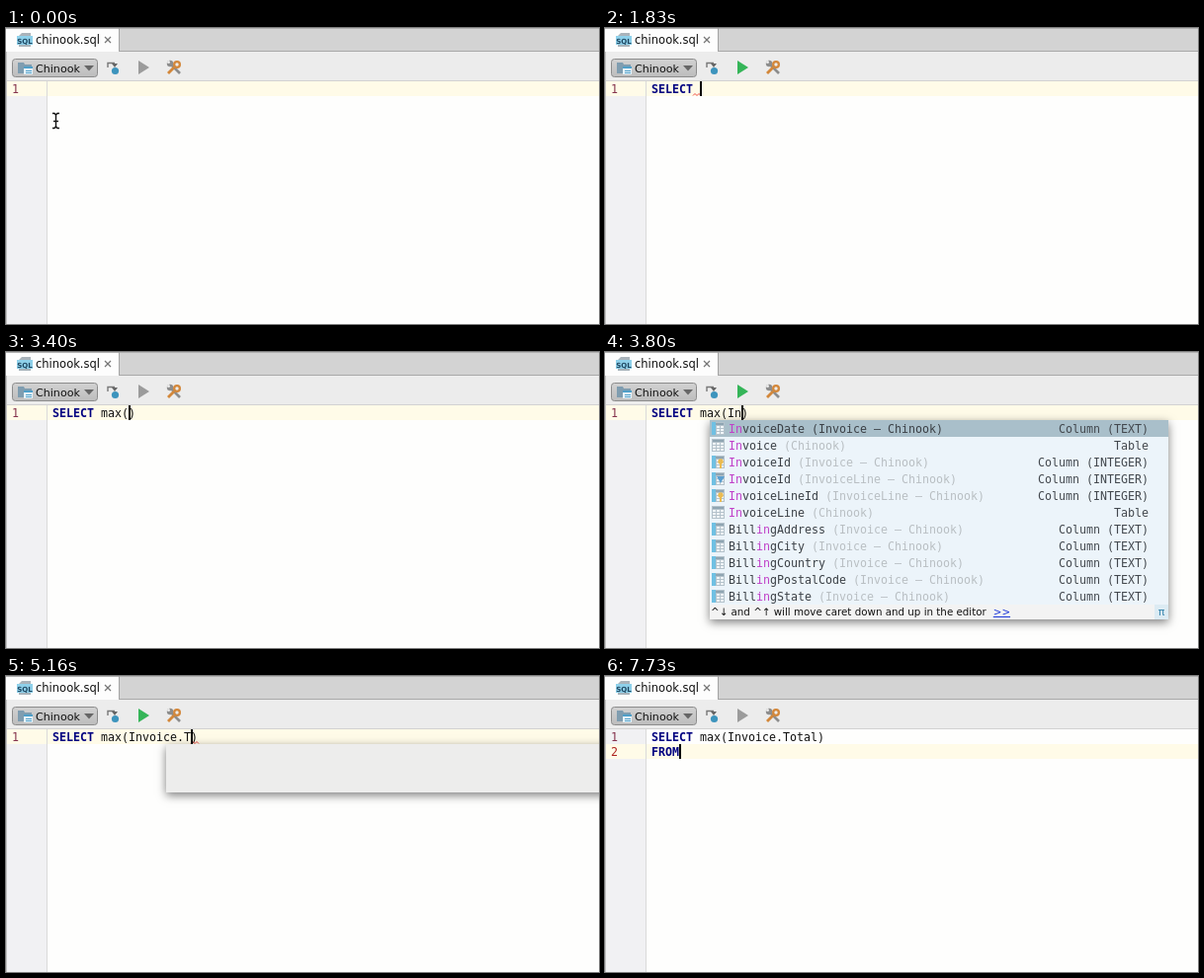
Animation, 600 px wide and 300 px high, one loop 8 s. Source, as an HTML page with a canvas:

```html
<!DOCTYPE html>
<html lang="en">
<head>
<meta charset="utf-8">
<title>SQL completion</title>
<style>
  html, body { margin: 0; width: 100%; height: 100%; overflow: hidden; background: #fefefd; }
  canvas { display: block; width: 600px; height: 300px; }
</style>
</head>
<body>
<canvas id="stage" width="600" height="300"></canvas>
<script>
const ctx = document.getElementById('stage').getContext('2d');
const LOOP = 8000, CHAR = 7, LINE = 15, ROW = 17, LEFT = 47, TOP = 54;
const MONO = '11.63px "DejaVu Sans Mono", monospace';
const UI = '"DejaVu Sans", sans-serif';

// ---- drawing helpers ----
function rect(x, y, w, h, color) {
  ctx.fillStyle = color;
  ctx.fillRect(x, y, w, h);
}

function text(str, x, y, color, font = MONO, align = 'left') {
  ctx.font = font;
  ctx.textAlign = align;
  ctx.fillStyle = color;
  ctx.fillText(str, x, y);
  return ctx.measureText(str).width;
}

function shape(points, color) {
  ctx.fillStyle = color;
  ctx.beginPath();
  points.forEach(([x, y]) => ctx.lineTo(x, y));
  ctx.fill();
}

function stroke(points, color, width = 1) {
  ctx.strokeStyle = color;
  ctx.lineWidth = width;
  ctx.beginPath();
  points.forEach(([x, y], i) => i ? ctx.lineTo(x, y) : ctx.moveTo(x, y));
  ctx.stroke();
}

function disc(x, y, r, color) {
  ctx.fillStyle = color;
  ctx.beginPath();
  ctx.arc(x, y, r, 0, 7);
  ctx.fill();
}

function vertical(y0, y1, from, to) {
  const g = ctx.createLinearGradient(0, y0, 0, y1);
  g.addColorStop(0, from);
  g.addColorStop(1, to);
  return g;
}

// ---- completion data ----
const item = (kind, name, detail = '', type = '') => ({ kind, name, detail, type });
const column = (kind, name, table, type = 'INTEGER') =>
  item(kind, name, ` (${table} – Chinook)`, `Column (${type})`);
const table = name => item('table', name, ' (Chinook)', 'Table');
const func = (name, args) => item('func', name, `(${args})`, 'Core Function');
const keyword = name => item('keyword', name);
const pair = name => [func(name, 'X'), func(name, 'X,Y,...')];
const billing = ['Address', 'City', 'Country', 'PostalCode', 'State']
  .map(part => column('column', 'Billing' + part, 'Invoice', 'TEXT'));

const mItems = [
  column('key', 'MediaTypeId', 'MediaType'), table('MediaType'),
  column('ref', 'MediaTypeId', 'Track'), column('column', 'Milliseconds', 'Track'),
  ...pair('max'), ...pair('min'),
  column('key', 'AlbumId', 'Album'), table('Album'), column('ref', 'AlbumId', 'Track')
];
const maItems = [...pair('max'),
  column('column', 'Email', 'Customer', 'TEXT'), column('column', 'Email', 'Employee', 'TEXT')];
const invoiceItems = [
  column('column', 'InvoiceDate', 'Invoice', 'TEXT'), table('Invoice'),
  column('key', 'InvoiceId', 'Invoice'), column('ref', 'InvoiceId', 'InvoiceLine'),
  column('key', 'InvoiceLineId', 'InvoiceLine'), table('InvoiceLine')
];
const tableFirst = [invoiceItems[1], invoiceItems[0], ...invoiceItems.slice(2)];
const columnItems = [invoiceItems[0], invoiceItems[2], ...billing];
const totalItems = [column('column', 'Total', 'Invoice', 'NUMERIC'), column('ref', 'CustomerId', 'Invoice')];

const DOT_HINT = 'Press ^. to choose the selected (or first) suggestion and insert a dot afterwards';
const MOVE_HINT = '^↓ and ^↑ will move caret down and up in the editor';

const popup = (x, right, y, items, typed, extra) =>
  ({ x, right, y, items, typed, listHeight: items.length * ROW, ...extra });
const blank = (x, right, y = 69) => ({ x, right, y, blank: true });
const keywords = (typed, y, ...names) => popup(40, 505, y, names.map(keyword), typed, { plain: true });
const functions = (typed, items, extra) => popup(78, 578, 69, items, typed, extra);
const invoices = (typed, items, right = 570) => popup(106, right, 69, items, typed);
const columns = (typed, items) => popup(162, 620, 69, items, typed);
const call = inner => `SELECT max(${inner})`;

// ---- timeline: each entry changes part of the state ----
const timeline = [
  [0, { lines: [''], caret: null, mouse: true, popup: null, bold: [], run: false, marks: [], squiggle: null }],
  [200, { mouse: false }],
  [360, { lines: ['S'], caret: [0, 1] }],
  [400, { popup: blank(40, 508) }],
  [430, { popup: keywords('S', 69, 'SELECT', 'SAVEPOINT') }],
  [700, { lines: ['SE'], caret: [0, 2] }],
  [760, { popup: keywords('SE', 69, 'SELECT') }],
  [830, { lines: ['SEL'], caret: [0, 3] }],
  [870, { popup: keywords('SEL', 69, 'SELECT') }],
  [960, { lines: ['SELE'], caret: [0, 4] }],
  [1000, { popup: keywords('SELE', 69, 'SELECT') }],
  [1500, { lines: ['SELECT'], caret: [0, 6], popup: null }],
  [1560, { bold: [0] }],
  [1800, { lines: ['SELECT '], caret: [0, 7] }],
  [1830, { run: true, squiggle: 6 }],
  [2100, { run: false }],
  [2330, { lines: ['SELECT m'], caret: [0, 8] }],
  [2400, { popup: blank(78, 578) }],
  [2460, { popup: functions('m', mItems, { listHeight: 179, thumb: true }) }],
  [2730, { lines: ['SELECT ma'], caret: [0, 9] }],
  [2760, { popup: functions('ma', maItems) }],
  [3060, { lines: ['SELECT max'], caret: [0, 10] }],
  [3100, { popup: functions('max', pair('max')) }],
  [3400, { lines: [call('')], caret: [0, 11], popup: null, squiggle: null }],
  [3430, { run: true }],
  [3560, { lines: [call('I')], caret: [0, 12] }],
  [3600, { popup: blank(106, 570) }],
  [3640, { popup: invoices('I', [...invoiceItems, ...billing]) }],
  [3730, { lines: [call('In')], caret: [0, 13] }],
  [3770, { popup: invoices('In', [...invoiceItems, ...billing]) }],
  [3900, { lines: [call('Inv')], caret: [0, 14] }],
  [3960, { popup: invoices('Inv', invoiceItems, 560) }],
  [4100, { lines: [call('Invo')], caret: [0, 15], popup: invoices('Invo', invoiceItems, 560) }],
  [4300, { popup: invoices('Invo', tableFirst, 560) }],
  [4560, { lines: [call('Invoice')], caret: [0, 18], popup: null }],
  [4600, { lines: [call('Invoice.')], caret: [0, 19], squiggle: 19 }],
  [4700, { popup: blank(162, 620) }],
  [4760, { popup: columns('', columnItems) }],
  [5160, { lines: [call('Invoice.T')], caret: [0, 20], popup: blank(162, 620), squiggle: 20 }],
  [5200, { popup: columns('T', totalItems) }],
  [5530, { lines: [call('Invoice.Total')], caret: [0, 24], popup: null, squiggle: null }],
  [5860, { marks: [[19, 5, '#e2e2f6']] }],
  [6500, { caret: [0, 25] }],
  [6560, { marks: [[19, 5, '#e2e2f6'], [10, 1, '#99d1f2'], [24, 1, '#99d1f2']] }],
  [6800, { lines: [call('Invoice.Total'), ''], caret: [1, 0] }],
  [6850, { marks: [] }],
  [6900, { lines: [call('Invoice.Total'), 'F'], caret: [1, 1] }],
  [6930, { popup: blank(40, 505, 84) }],
  [6960, { popup: keywords('F', 84, 'FROM') }],
  [7000, { lines: [call('Invoice.Total'), 'FR'], caret: [1, 2] }],
  [7050, { run: false }],
  [7100, { popup: keywords('FR', 84, 'FROM') }],
  [7630, { lines: [call('Invoice.Total'), 'FROM'], caret: [1, 4], popup: null }],
  [7700, { bold: [0, 1] }]
];

const stateAt = time => Object.assign({}, ...timeline.filter(([t]) => t <= time).map(([, s]) => s));

// ---- window chrome ----
function drawTab() {
  rect(0, 0, 600, 24, '#d3d3d3');
  rect(0, 0, 114, 24, '#fdfdfd');
  rect(0, 0, 600, 1, '#b2b2b2');
  rect(114, 0, 1, 24, '#a3a3a3');
  rect(114, 23, 486, 1, '#a8a8a8');
  shape([[16, 5], [25, 5], [25, 19], [13, 19], [13, 8]], '#a9b3ba');
  rect(11, 8, 16, 9, '#8ed0ea');
  text('SQL', 19, 15.5, '#1e4660', `bold 7px ${UI}`, 'center');
  text('chinook.sql', 30, 16, '#111', `11.5px ${UI}`);
  stroke([[100, 9], [106, 15]], '#777', 1.3);
  stroke([[106, 9], [100, 15]], '#777', 1.3);
}

function drawToolbar(run) {
  rect(0, 24, 600, 30, '#ececec');
  rect(0, 53, 600, 1, '#d2d2d2');

  ctx.beginPath();
  ctx.roundRect(6.5, 31.5, 86, 18, 3);
  ctx.fillStyle = vertical(31, 50, '#d2d2d2', '#bcbcbc');
  ctx.fill();
  ctx.strokeStyle = '#8c8c8c';
  ctx.lineWidth = 1;
  ctx.stroke();
  shape([[12, 35], [18, 35], [19, 37], [26, 37], [26, 46], [12, 46]], '#7f9db0');
  rect(18, 39, 9, 8, '#e6f3fa');
  rect(18, 39, 9, 2, '#4f9fc8');
  rect(20, 43, 6, 1, '#4f9fc8');
  rect(20, 45, 6, 1, '#4f9fc8');
  text('Chinook', 30, 45, '#111', `11.1px ${UI}`);
  shape([[79, 38], [89, 38], [84, 43.5]], '#666');

  stroke([[103, 40], [103, 35.5], [110, 35.5]], '#777', 1.4);
  shape([[107, 36], [113, 36], [110, 40]], '#666');
  disc(110.5, 43.5, 3.6, '#3d94bd');

  shape([[134, 33], [145, 40], [134, 47]], run ? '#35b558' : '#9b9b9b');

  stroke([[166, 36], [176, 46]], '#8d8d8d', 2.6);
  disc(166, 36, 3.2, '#8d8d8d');
  disc(164.5, 34.5, 1.5, '#ececec');
  stroke([[164, 46], [170, 40]], '#d3873a', 2.8);
  disc(173, 37, 4, '#d3873a');
  disc(173, 37, 1.7, '#ececec');
}

// ---- editor ----
function drawEditor(state) {
  const current = state.caret ? state.caret[0] : 0;
  rect(0, TOP, 600, 246, '#fefefd');
  rect(0, TOP, 41, 246, '#f1f1f3');
  rect(0, TOP + current * LINE, 600, LINE, '#fffbe8');
  rect(41, TOP, 1, 246, '#dadada');
  rect(0, 24, 1, 276, '#c3c3c3');

  for (const [col, length, color] of state.marks)
    rect(LEFT + col * CHAR, TOP, length * CHAR, LINE, color);

  state.lines.forEach((line, i) => {
    const y = TOP + 12 + i * LINE;
    text(String(i + 1), 6, y, i ? '#ae2420' : '#86344e');
    const split = state.bold.includes(i) ? line.match(/^\w+/)[0].length : 0;
    text(line.slice(0, split), LEFT, y, '#000080', 'bold ' + MONO);
    text(line.slice(split), LEFT + split * CHAR, y, '#111');
  });

  if (state.squiggle !== null) {
    const x = LEFT + state.squiggle * CHAR;
    stroke([0, 2, 4, 6, 8].map((dx, i) => [x + dx, i % 2 ? 66.5 : 68.5]), '#f04a45');
  }
  if (state.caret) {
    const [row, col] = state.caret;
    rect(LEFT + col * CHAR, TOP + row * LINE, 2, LINE, '#000');
  }
}

// ---- completion popup ----
function drawIcon(kind, x, y) {
  if (kind === 'func') {
    disc(x + 8, y + 8.5, 6.5, '#f3d5a0');
    text('f', x + 8, y + 12, '#8a6a35', `10px ${UI}`, 'center');
    return;
  }
  const isTable = kind === 'table';
  rect(x + 2, y + 2, 13, 13, '#b4c2cb');
  rect(x + 3, y + 3, 11, 2, '#8fa5b2');
  for (let i = 0; i < 3; i++) {
    rect(x + 3, y + 6 + i * 3, 3, 2, isTable ? '#f0f5f8' : '#55b4dd');
    rect(x + 7, y + 6 + i * 3, 3, 2, '#f0f5f8');
    rect(x + 11, y + 6 + i * 3, 3, 2, '#f0f5f8');
  }
  if (!isTable) rect(x + 2, y + 2, 4, 13, '#6fc0e3');
  if (kind === 'key') {
    disc(x + 11, y + 8, 2.7, '#eabb52');
    rect(x + 10, y + 9, 2, 6, '#eabb52');
  }
  if (kind === 'ref') shape([[x + 7, y + 6], [x + 15, y + 6], [x + 11, y + 13]], '#5b9fd0');
}

function drawRow(p, entry, index, right) {
  const y = p.y + index * ROW, base = y + 12.5, selected = index === 0;
  const font = p.plain ? 'bold ' + MONO : MONO;
  if (selected) rect(p.x, y, right - p.x, ROW, '#a9bfca');
  if (!p.plain) drawIcon(entry.kind, p.x, y);

  let x = p.x + (p.plain ? 8 : 19);
  const at = entry.name.toLowerCase().indexOf(p.typed.toLowerCase());
  const end = at + p.typed.length;
  const parts = [
    [entry.name.slice(0, at), '#3b4046'],
    [entry.name.slice(at, end), '#c03fc8'],
    [entry.name.slice(end), '#3b4046']
  ];
  for (const [part, color] of parts) {
    text(part, x, base, color, font);
    x += part.length * CHAR;
  }
  text(entry.detail, x, base, selected ? '#3b4046' : '#b9bfc3');
  text(entry.type, p.right - (p.right === 560 ? 11 : 20), base, '#43484e', MONO, 'right');
}

function drawHint(p, y, width) {
  rect(p.x, y, width, 15, '#f3f3f3');
  const font = `${p.plain ? 10.63 : 10.3}px ${UI}`;
  const x = p.x + 1, base = y + 11;
  const linkX = x + text(p.plain ? DOT_HINT : MOVE_HINT, x, base, '#111', font) + 7;
  const linkWidth = text('>>', linkX, base, '#1a35d8', font);
  rect(linkX, base + 1, linkWidth, 1, '#1a35d8');
  if (!p.plain) {
    rect(p.right - 14, y, 14, 15, '#dcebf3');
    text('π', p.right - 7, base, '#3a87ae', `11px ${UI}`, 'center');
  }
}

function drawPopup(p) {
  const width = p.right - p.x;
  const height = p.blank ? 49 : p.listHeight + 15;
  ctx.save();
  ctx.shadowColor = 'rgba(0,0,0,.5)';
  ctx.shadowBlur = 9;
  ctx.shadowOffsetY = 3;
  rect(p.x, p.y, width, height, p.blank ? '#ededec' : '#ecf4fa');
  ctx.restore();
  if (p.blank) return;

  ctx.save();
  ctx.beginPath();
  ctx.rect(p.x, p.y, width, p.listHeight);
  ctx.clip();
  const right = p.thumb ? p.right - 12 : p.right;
  p.items.forEach((entry, i) => drawRow(p, entry, i, right));
  if (p.thumb) {
    rect(right, p.y, 12, p.listHeight, '#f3f3f3');
    rect(right + 1, p.y, 10, 41, '#c3c3c3');
    rect(right + 2, p.y + 1, 4, 39, '#d3d3d3');
  }
  ctx.restore();
  drawHint(p, p.y + p.listHeight, width);
}

function drawMouse() {
  for (const [color, width] of [['#fff', 3], ['#111', 1.4]]) {
    stroke([[47, 86.5], [49, 86.5], [50.5, 88], [52, 86.5], [54, 86.5]], color, width);
    stroke([[50.5, 88], [50.5, 100]], color, width);
    stroke([[47, 101.5], [49, 101.5], [50.5, 100], [52, 101.5], [54, 101.5]], color, width);
    stroke([[48, 94.5], [53, 94.5]], color, width);
  }
}

function frame() {
  const state = stateAt(performance.now() % LOOP);
  drawTab();
  drawToolbar(state.run);
  drawEditor(state);
  if (state.popup) drawPopup(state.popup);
  if (state.mouse) drawMouse();
  requestAnimationFrame(frame);
}
frame();
</script>
</body>
</html>
```
